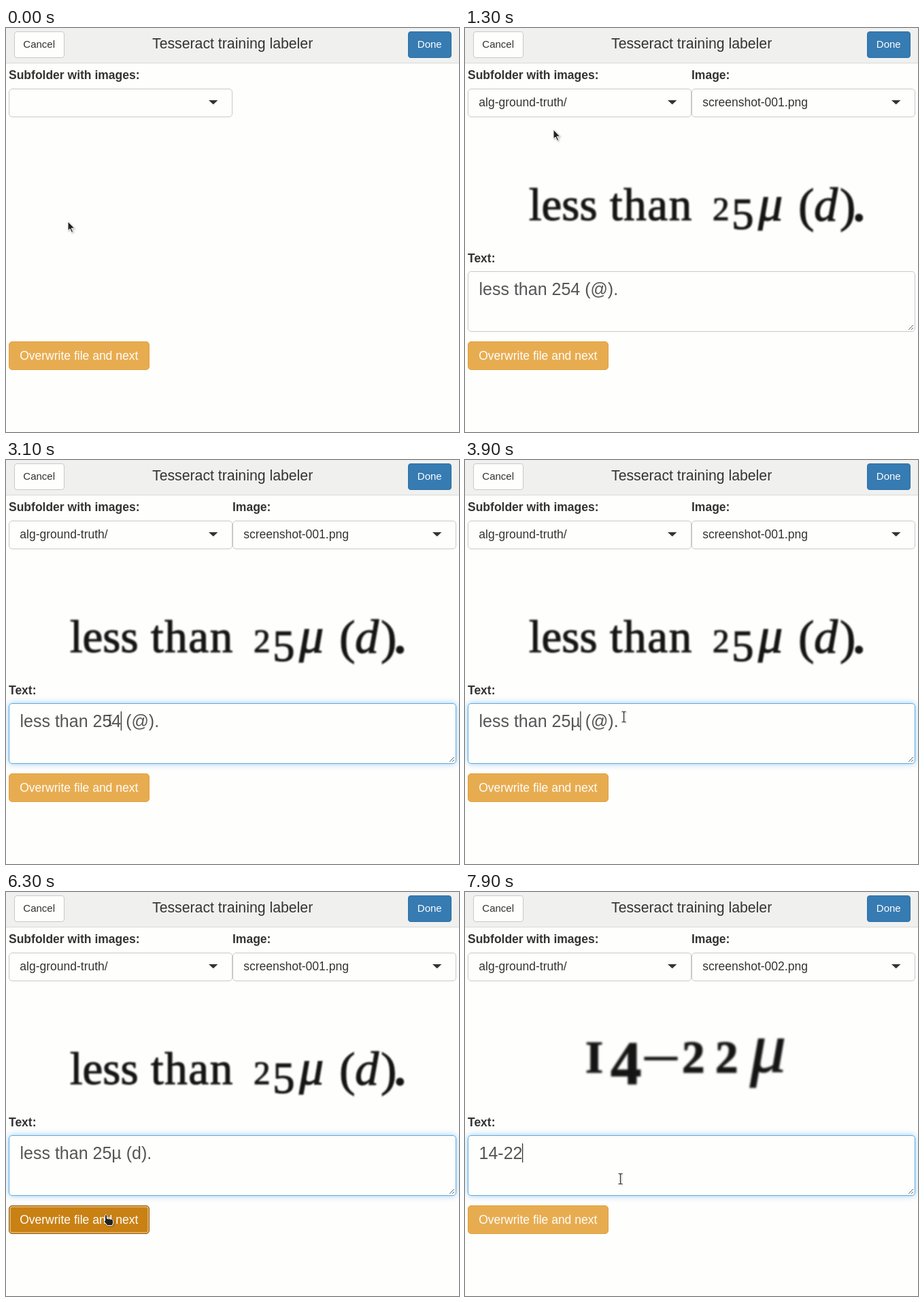
These frames come from a looping animation (666 px wide and 593 px high, 8 s). An HTML page:

```html
<!DOCTYPE html>
<html lang="en">
<head>
<meta charset="utf-8">
<title>Training labeler</title>
<style>
html, body { margin: 0; width: 100%; height: 100%; overflow: hidden; background: #fefefd; }
svg { display: block; font: 17.5px "Liberation Sans", Arial, sans-serif; fill: #333; }
.box { fill: #fefefd; stroke: #c9c9c9; }
.focus { stroke: #5dacdf; filter: drop-shadow(0 0 5px rgba(102,175,233,.65)); }
.small { font-size: 15px; }
.bold { font-weight: bold; }
.light { fill: #fefefd; }
.menu { filter: drop-shadow(0 6px 6px rgba(0,0,0,.18)); }
#btn { fill: #e8ac50; stroke: #e0a03f; }
#btn.hover { fill: #df9522; stroke: #c98a2c; }
#btn.used { fill: #df9522; stroke: #985f0d; }
#btn.down { fill: #c98114; stroke: #8f5a0c; }
#entry { font-size: 25px; fill: #555; }
.scan { font: 67px "Liberation Serif", "Times New Roman", serif; fill: #151515; stroke: #151515; stroke-width: 1.2; filter: blur(.9px); }
.scan .it { font-style: italic; }
#scan2 { font-weight: bold; filter: blur(1.5px); }
.cursor { fill: #222; stroke: #fff; stroke-width: 1; filter: drop-shadow(1px 1px 1px rgba(0,0,0,.3)); }
</style>
</head>
<body>
<svg width="666" height="593" viewBox="0 0 666 593">
  <rect width="666" height="51" fill="#f0f0ef"/>
  <rect y="51" width="666" height="1" fill="#dadad9"/>
  <rect class="box" x="12.5" y="5.5" width="73" height="38" rx="3.5"/>
  <text class="small" x="25.3" y="29">Cancel</text>
  <text x="215" y="30" font-size="21.25">Tesseract training labeler</text>
  <rect x="591.5" y="5.5" width="63" height="38" rx="3.5" fill="#367bb2" stroke="#2e6da4"/>
  <text class="small light" x="604.8" y="29">Done</text>

  <text class="bold" x="4" y="75">Subfolder with images:</text>
  <rect id="folder" class="box" x="4.5" y="89.5" width="328" height="41" rx="4.5"/>
  <text id="folderName" x="20.3" y="115">alg-ground-truth/</text>
  <path id="arrow1"/>

  <g id="loaded">
    <text class="bold" x="333" y="75">Image:</text>
    <rect class="box" x="333.5" y="89.5" width="328" height="41" rx="4.5"/>
    <text id="imageName" x="349.2" y="115"></text>
    <path d="M627 106h13.4l-6.7 6.3z"/>
    <g id="scan1" class="scan">
      <text x="94" y="282">less</text>
      <text x="213" y="282" letter-spacing="1.6">than</text>
      <text x="364" y="282" font-size="49">2</text>
      <text x="392" y="295" font-size="65">5</text>
      <text class="it" x="431" y="282" font-size="72">μ</text>
      <text x="490" y="284" font-size="70">(</text>
      <text class="it" x="513" y="283" font-size="70">d</text>
      <text x="551" y="284" font-size="70">)</text>
      <text x="568" y="283" font-size="90">.</text>
    </g>
    <g id="scan2" class="scan">
      <text x="177" y="265">I</text>
      <text x="214" y="282" font-size="91">4</text>
      <rect x="264" y="242.500" width="48" height="4"/>
      <text x="319" y="265">2</text>
      <text x="368" y="265">2</text>
      <text class="it" x="419" y="264" font-size="106" font-weight="normal">μ</text>
    </g>
    <text class="bold" x="4" y="344">Text:</text>
    <rect id="area" class="box" x="4.500" y="357.500" width="657" height="88" rx="4.500"/>
    <path d="M652 443l7-7M656 443l3-3" fill="none" stroke="#666"/>
    <text id="entry" x="20.500" y="392"></text>
    <rect id="caret" y="369" width="1.300" height="28"/>
  </g>

  <rect id="btn" x="4.500" y="460.500" width="206" height="41" rx="4.500"/>
  <rect id="ring" x="6" y="462" width="203" height="38" rx="3" fill="none" stroke="#f3d9a8"/>
  <text class="light" x="20.200" y="487">Overwrite file and next</text>

  <g id="menu">
    <rect class="box menu" x="4.500" y="134.500" width="328" height="46" rx="4"/>
    <rect x="5" y="141" width="327" height="33" fill="#f3f3f3"/>
    <text x="20.300" y="163">alg-ground-truth/</text>
    <rect x="20" y="99" width="1.200" height="21"/>
  </g>

  <g id="cursor" class="cursor">
    <path id="pointer" d="M0 0v13.500l3-2.700 2.500 5.400 2.200-1-2.500-5.200h4.600z"/>
    <path id="hand" d="M.500 1.500q1.700-2 3.200 0v5q1.500-1 2.600.4 1.500-.9 2.600.4 1.800-.7 2.800.700l1 1v4l-1.500 3.500h-7l-4.500-5q-1-2 .8-2z"/>
    <g id="beam" fill="none" stroke="#333" stroke-width="1.200">
      <path d="M-3-7.500h2.200l.8.800.8-.8h2.200M0-7v14M-3 7.500h2.200l.8-.8.8.8h2.200"/>
    </g>
  </g>
</svg>
<script>
const $ = id => document.getElementById(id);
const show = (id, on) => { $(id).style.display = on ? '' : 'none'; };

// time, x, y of the mouse
const path = [
  [0, 91, 284], [600, 136, 114], [900, 135, 116], [1100, 130, 147], [1400, 130, 150],
  [2000, 224, 377], [2200, 206, 365], [2400, 206, 365], [2800, 172, 382], [3200, 149, 382],
  [3400, 149, 382], [3500, 233.5, 377], [5600, 233.5, 377], [6100, 145, 473], [6500, 145, 473],
  [7000, 231.5, 418], [7100, 230, 419], [7300, 230, 419], [7600, 228.5, 421], [8000, 228.5, 421]
];

// time, content of the text area, caret index (-1: hidden)
const edits = [
  [0, '', -1],
  [1300, 'less than 254 (@).', -1],
  [2800, 'less than 254 (@).', 13],
  [3500, 'less than 2 (@).', 11],
  [3800, 'less than 25 (@).', 12],
  [3900, 'less than 25µ (@).', 13],
  [4300, 'less than 25µ (@).', 15],
  [4500, 'less than 25µ (@).', -1],
  [4700, 'less than 25µ ().', 15],
  [5200, 'less than 25µ (d).', 16],
  [5700, 'less than 25µ (d).', -1],
  [6600, '14-22', -1],
  [7500, '14-22', 5]
];

function mouseAt(t) {
  const i = Math.max(1, path.findIndex(p => p[0] >= t));
  const [t0, x0, y0] = path[i - 1], [t1, x1, y1] = path[i];
  const k = (t - t0) / (t1 - t0), e = k * k * (3 - 2 * k);
  return [x0 + (x1 - x0) * e, y0 + (y1 - y0) * e];
}

function cursorKind(y, open, loaded) {
  if (!loaded) return y < (open ? 181 : 131) ? 'hand' : 'pointer';
  if (y >= 460) return 'hand';
  return y > 357 && y < 446 ? 'beam' : 'pointer';
}

function buttonState(t, hover) {
  if (t >= 6200 && t < 6500) return 'down';
  if (t >= 6500 && t < 7500) return 'used';
  return hover ? 'hover' : '';
}

function draw(t) {
  const loaded = t >= 1300, open = t >= 800 && !loaded, second = t >= 6600;
  show('loaded', loaded);
  show('folderName', loaded);
  show('menu', open);
  $('folder').classList.toggle('focus', open);
  $('arrow1').setAttribute('d', open ? 'M298 111h13.4l-6.7-6.3z' : 'M298 106h13.4l-6.7 6.3z');

  show('scan1', !second);
  show('scan2', second);
  $('imageName').textContent = `screenshot-00${second ? 2 : 1}.png`;
  $('area').classList.toggle('focus', t >= 2800 && t < 6400 || t >= 7500);

  const [, text, caret] = edits.findLast(e => e[0] <= t);
  $('entry').textContent = text;
  show('caret', caret >= 0);
  if (caret >= 0) $('caret').setAttribute('x', 20 + $('entry').getSubStringLength(0, caret));

  const [x, y] = mouseAt(t), kind = cursorKind(y, open, loaded);
  for (const id of ['pointer', 'hand', 'beam']) show(id, id === kind);
  $('cursor').setAttribute('transform', `translate(${x} ${y})`);

  const state = buttonState(t, loaded && y >= 460);
  $('btn').setAttribute('class', state);
  show('ring', state === 'down');
}

const start = performance.now();
function tick() {
  const t = (performance.now() - start) % 8000;
  draw(Math.floor(t / 100) * 100);
  requestAnimationFrame(tick);
}
tick();
</script>
</body>
</html>
```
